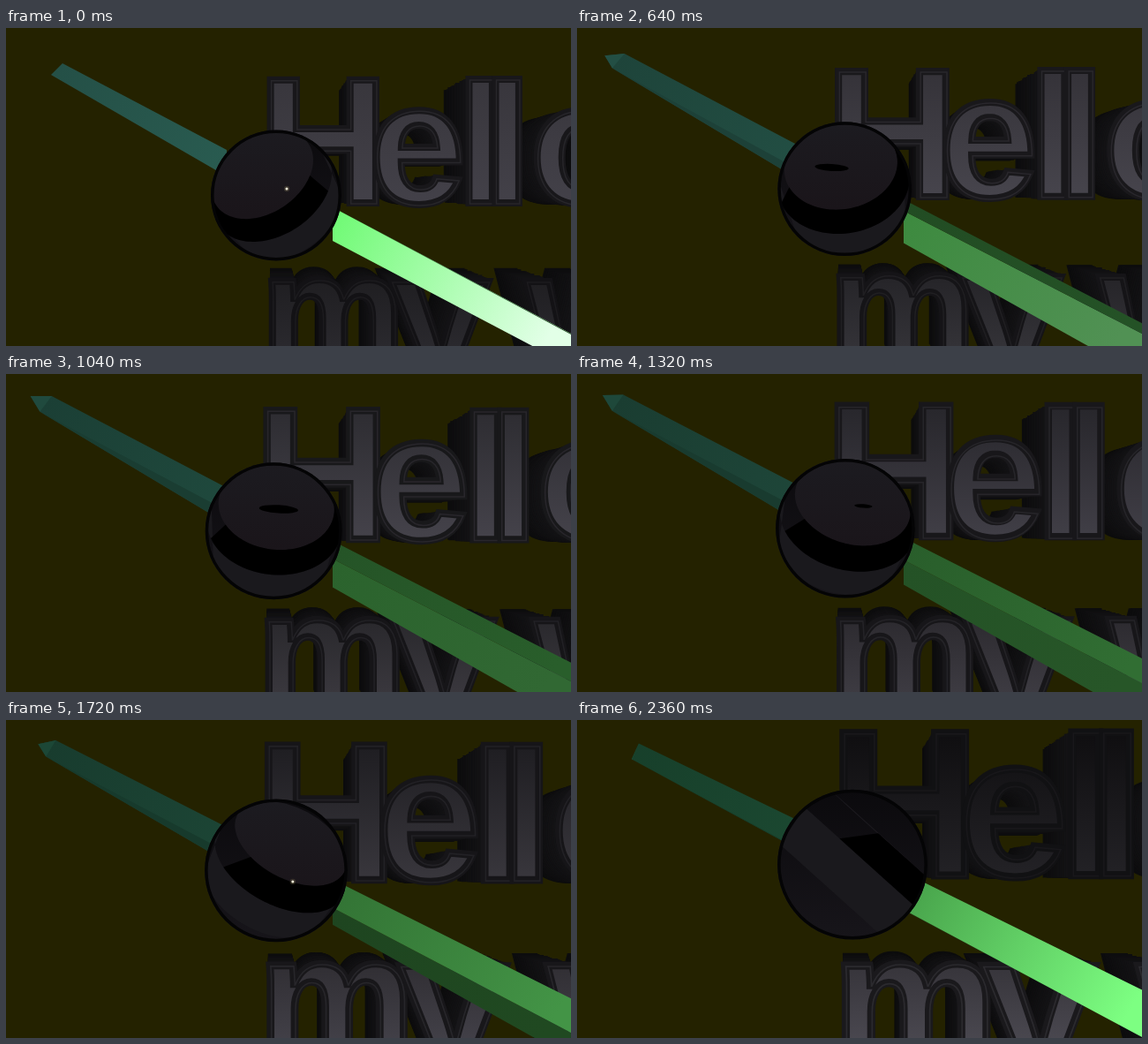
Animation of 640x360 px, one loop 2.4 s. Source, as an HTML page with a canvas:

```html
<!DOCTYPE html>
<html lang="en">
<head>
<meta charset="utf-8">
<title>Hello my world</title>
<style>
  html, body { margin: 0; width: 100%; height: 100%; overflow: hidden; background: #242200; }
  canvas { display: block; width: 640px; height: 360px; }
</style>
</head>
<body>
<canvas id="stage" width="640" height="360"></canvas>
<script>
const ctx = document.getElementById('stage').getContext('2d');
const LOOP = 2400, STEP = 40;
const EYE = { x: 300, y: 180 }, DEPTH = .12, LAYERS = 18;
const FONT_SIZE = 203;

// Character, x, baseline, relative size
const LINES = [
  [['H', 286, 197.5, 1], ['e', 412, 197.5, .96], ['l', 511, 197.5, .95],
   ['l', 541, 197.5, .95], ['o', 594, 197.5, .96]],
  [['m', 289, 383, .9], ['y', 435, 394, 1], ['w', 590, 394, 1]]
];

let u = 0;  // progress through the loop, 0 to 1

// Parabola through a value at the start, the middle and the end of the loop
const arc = (a, b, c) => a + (4 * b - 3 * a - c) * u + 2 * (a + c - 2 * b) * u * u;
const rgb = c => `rgb(${c.map(v => Math.max(0, Math.min(255, Math.round(v)))).join()})`;
const grey = v => rgb([v, v * .97, v * 1.08]);
const green = (g, white = 0) => rgb([g * .44 + white, g, g * .46 + white]);

function poly(fill, ...pts) {
  ctx.beginPath();
  pts.forEach(p => ctx.lineTo(p[0], p[1]));
  ctx.closePath();
  ctx.fillStyle = fill;
  ctx.fill();
}

function oval(x, y, rx, ry, turn, fill) {
  ctx.beginPath();
  ctx.ellipse(x, y, rx, ry, turn, 0, 7);
  ctx.fillStyle = fill;
  ctx.fill();
}

function blend(x0, y0, x1, y1, from, to) {
  const g = ctx.createLinearGradient(x0, y0, x1, y1);
  g.addColorStop(0, from);
  g.addColorStop(1, to);
  return g;
}

function eachLetter(line, paint) {
  for (const [char, x, y, size] of line) {
    ctx.font = `bold ${FONT_SIZE * size}px "Liberation Sans", Arial, sans-serif`;
    paint(char, x, y);
  }
}

function drawFace(line, light, y0, y1, topShade) {
  const face = blend(0, y0, 0, y1, grey(light * topShade), grey(light * 1.2));
  eachLetter(line, (char, x, y) => {
    ctx.fillStyle = face;
    ctx.fillText(char, x, y);
    ctx.lineWidth = 8;
    ctx.strokeStyle = grey(10 + light * .25);
    ctx.strokeText(char, x, y);
    ctx.lineWidth = 1.5;
    ctx.strokeStyle = grey(8 + light * .55);
    ctx.strokeText(char, x + 1, y + 1);
  });
}

function drawText() {
  const left = arc(297, 293, 299.3), top = arc(56, 37, 11.5), scale = arc(1, 1.05, 1.157);
  ctx.lineJoin = 'miter';
  ctx.miterLimit = 3;
  for (let i = LAYERS; i >= 0; i--) {
    const k = 1 - DEPTH * i / LAYERS;
    ctx.save();
    ctx.translate(EYE.x, EYE.y);
    ctx.scale(k, k);
    ctx.translate(left - EYE.x, top - EYE.y);
    ctx.scale(scale, scale);
    ctx.translate(-297, -56);
    ctx.fillStyle = ctx.strokeStyle = grey(20 - 8 * i / LAYERS);
    ctx.lineWidth = 4;
    LINES.forEach(line => eachLetter(line, (char, x, y) => {
      ctx.strokeText(char, x, y);
      ctx.fillText(char, x, y);
    }));
    if (i === 0) {
      drawFace(LINES[0], arc(56, 56, 28), 56, 200, 1 - .5 * u);
      drawFace(LINES[1], 36 + 28 * u, 284, 370, .85);
    }
    ctx.restore();
  }
}

function drawBlade() {
  // Far half: tip corners a, b, c and the edge heights behind the ball
  const a = [arc(51, 28, 64), arc(53, 24, 46)];
  const b = [arc(64, 52, 71), arc(40, 24, 27)];
  const c = [arc(51, 39, 64), arc(53, 42, 45)];
  const top = arc(138, 127, 113), bottom = arc(168, 168, 145);
  const ridge = bottom - 15 * Math.sin(Math.PI * u);
  const teal = k => rgb([arc(38, 28, 25) * k, arc(84, 66, 67) * k, arc(74, 54, 45) * k]);
  poly(blend(40, 40, 250, 150, teal(.94), teal(1.08)), a, b, [250, top], [250, bottom], c);
  poly(teal(.9), c, [250, ridge], [250, bottom]);
  poly(teal(1.1), a, b, c);

  // Near half: as the blade rolls, the upper face lights up and the lower one fades
  const low0 = arc(241, 240, 214), low1 = arc(383, 393, 357);
  const mid0 = Math.min(low0, arc(203, 210, 215)), mid1 = Math.min(low1, arc(346, 349, 364));
  const top0 = arc(203, 187, 172), top1 = arc(347, 324, 305);
  const dim = 65 + 185 * (1 - u) ** 3, lit = 75 + 180 * u ** 3;
  const face = (y0, y1, y2, y3, near, far) =>
    poly(blend(375, 200, 620, 340, near, far), [370, y0], [640, y1], [640, y2], [370, y3]);
  face(mid0, mid1, low1, low0, green(dim), green(dim * 1.05, 110 * (1 - u) ** 6));
  face(top0, top1, mid1, mid0, green(lit * (1 - .35 * u * u)), green(lit * 1.05, 12 * u ** 6));
}

function drawBall() {
  const x = arc(306, 303.5, 312.5), y = arc(189.5, 176, 163.2), r = arc(74, 78.2, 85.2);

  // The pole of the ball swings from the upper left to the upper right rim
  const nx = -.4 + 1.1 * u, ny = -.6 - .16 * u, h = Math.hypot(nx, ny);
  const nz = Math.sqrt(Math.max(0, 1 - h * h));
  const rad = deg => deg * Math.PI / 180;
  const point = (lat, turn) => {
    const c = Math.cos(lat), e1 = Math.sin(lat) * Math.cos(turn), e2 = Math.sin(lat) * Math.sin(turn);
    return [
      x + r * (c * nx - e1 * ny / h - e2 * nx * nz / h),
      y + r * (c * ny + e1 * nx / h - e2 * ny * nz / h),
      c * nz + e2 * h
    ];
  };
  // Visible part of a belt between two latitudes, with slanted ends
  const belt = (lat0, lat1, from, to, slant, fill) => {
    const n = 60, rim0 = [], rim1 = [];
    for (let i = 0; i <= n; i++) {
      const deg = from + (to - from) * i / n;
      const p = point(rad(lat0), rad(deg - slant * i / n)), q = point(rad(lat1), rad(deg));
      if (p[2] > -.1) rim0.push(p);
      if (q[2] > -.1) rim1.unshift(q);
    }
    poly(fill, ...rim0, ...rim1);
  };

  ctx.save();
  ctx.beginPath();
  ctx.arc(x, y, r, 0, 7);
  ctx.clip();
  ctx.fillStyle = blend(x, y - r, x, y + r, '#0b0a0d', '#17151a');
  ctx.fillRect(x - r, y - r, 2 * r, 2 * r);
  oval(x + .53 * r * nx, y + .53 * r * ny, .85 * r, Math.max(.5, .85 * r * nz),
    Math.atan2(nx, -ny), blend(x, y - r, x, y + r * .3, '#1c1b20', '#1a151a'));
  belt(82, 116, -20, 200, 0, '#1a191d');
  belt(58, 82, Math.max(-30, 45 - 280 * u), 190 - 80 * u, 20 * u, '#000');

  // Slit in the dome, seen while it faces the viewer
  const open = Math.max(0, Math.sin(Math.PI * (u - .12) / .5));
  oval(x + r * (1.6 * u - .62), y - .32 * r, 24 * open, 5 * open, .06, '#000');

  ctx.strokeStyle = '#040405';
  ctx.lineWidth = 7;
  ctx.beginPath();
  ctx.arc(x, y, r, 0, 7);
  ctx.stroke();
  ctx.restore();

  if (u < .1 || (u > .66 && u < .95)) {
    const hx = 318 + 9.5 * u, hy = u < .1 ? 182 : 159 + 33.5 * u;
    oval(hx, hy, 3.2, 3.2, 0, 'rgba(150,140,100,.25)');
    oval(hx, hy, 1.5, 1.5, 0, '#f4f0d8');
  }
}

function tick() {
  u = Math.floor(performance.now() % LOOP / STEP) * STEP / LOOP;
  ctx.fillStyle = '#242200';
  ctx.fillRect(0, 0, 640, 360);
  drawText();
  drawBlade();
  drawBall();
  requestAnimationFrame(tick);
}
tick();
</script>
</body>
</html>
```
